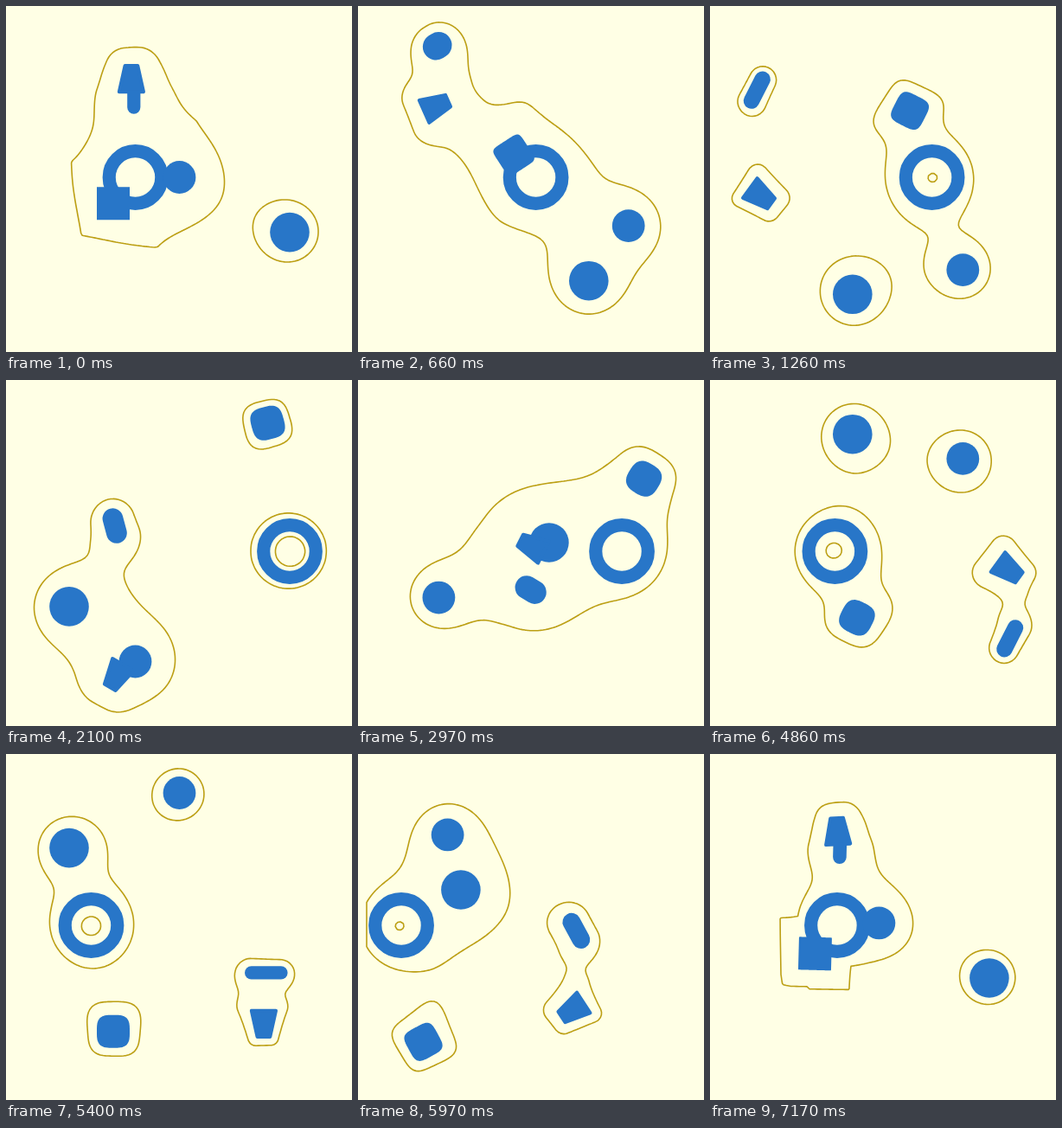
Recreate the animation shown at these times as an HTML page with a canvas. Size 400 by 400 pixels, loop 7200 ms.

```html
<!DOCTYPE html>
<html>
<head>
<meta charset="utf-8">
<style>
html, body { margin: 0; width: 100%; height: 100%; overflow: hidden; background: #ffffe5; }
canvas { display: block; width: 400px; height: 400px; }
</style>
</head>
<body>
<canvas id="stage" width="400" height="400"></canvas>
<script>
const ctx = document.getElementById('stage').getContext('2d');
const LOOP = 7200, STEP = 30, RAD = Math.PI / 180;
const CX = 200.5, CY = 198, AMP = 153, HALF = 190.5;
const CELL = 3, N = 127, SIDE = N + 3;
const BLUE = '#2876c8', LINE = '#bc9f14';
const { abs, min, max, hypot, cos, sin } = Math;
const clamp = (v, lo, hi) => max(lo, min(hi, v));
const field = new Float64Array(SIDE * SIDE);

// Grid lines; the outermost ones coincide with the border so that contours close there.
const offset = i => clamp(i - 1, 0, N) * CELL - HALF;

// Triangle wave of k cycles per loop, highest at the given angle.
function bounce(deg, k, peak) {
  const u = (deg - peak) * k / 360;
  return AMP * (abs(4 * (u - Math.floor(u)) - 2) - 1);
}

function toLocal(s, x, y) {
  const dx = x - s.x, dy = y - s.y;
  return [dx * s.c + dy * s.s, dy * s.c - dx * s.s];
}

function segDist(x, y, ax, ay, bx, by) {
  const dx = bx - ax, dy = by - ay;
  const h = clamp(((x - ax) * dx + (y - ay) * dy) / (dx * dx + dy * dy), 0, 1);
  return hypot(x - ax - h * dx, y - ay - h * dy);
}

function disc(r) {
  return {
    level: (u, v) => r / hypot(u, v),
    draw() { ctx.beginPath(); ctx.arc(0, 0, r, 0, 7); ctx.fill(); }
  };
}

function ring(r, w) {
  return {
    level: (u, v) => w / abs(hypot(u, v) - r),
    draw() { ctx.beginPath(); ctx.arc(0, 0, r, 0, 7); ctx.lineWidth = 2 * w; ctx.stroke(); }
  };
}

// Ball of the p-norm; very large powers overflow and drop out.
function normBall(r, p) {
  const norm = (u, v) => {
    const a = max(abs(u), abs(v)), b = min(abs(u), abs(v));
    return a ? a * (1 + (b / a) ** p) ** (1 / p) : 0;
  };
  return {
    level(u, v) {
      const m = max(abs(u), abs(v)) / r;
      return isFinite(p) && p * Math.log(m) > 88.7 ? 0 : r / norm(u, v);
    },
    draw() {
      ctx.beginPath();
      for (let i = 0; i < 120; i++) {
        const a = i * 3 * RAD, k = r / norm(cos(a), sin(a));
        ctx.lineTo(k * cos(a), k * sin(a));
      }
      ctx.fill();
    }
  };
}

function pill(w, h) {
  const r = min(w, h);
  return {
    level: (u, v) => r / hypot(max(abs(u) - w + r, 0), max(abs(v) - h + r, 0)),
    draw() { ctx.beginPath(); ctx.roundRect(-w, -h, 2 * w, 2 * h, r); ctx.fill(); }
  };
}

function trapezoid() {
  const a0 = -15.5, b0 = 16.5, a1 = 18.7, b1 = 9, size = 13.7, r = 2;
  return {
    level(u, v) {
      v = abs(v);
      if (u > a0 && u < a1 && v < b0 + (b1 - b0) * (u - a0) / (a1 - a0)) return 9;
      const d = min(segDist(u, v, a0, 0, a0, b0), segDist(u, v, a0, b0, a1, b1), segDist(u, v, a1, b1, a1, 0));
      return size / (size + d);
    },
    draw() {
      const p = a0 + r, q = a1 - r, e = b0 - r - 0.4, f = b1 - r + 0.4;
      ctx.beginPath();
      ctx.moveTo(p, -e); ctx.lineTo(q, -f); ctx.lineTo(q, f); ctx.lineTo(p, e);
      ctx.closePath();
      ctx.lineWidth = 2 * r;
      ctx.fill(); ctx.stroke();
    }
  };
}

function scene(deg) {
  const power = 1.2 + 1.5 / sin(deg / 2 * RAD);
  const stretch = -8.6 * cos(8 * deg * RAD);
  const place = (shape, x, y, turn = 0) => ({
    ...shape, x: CX + x, y: CY + y, turn: turn * RAD, c: cos(turn * RAD), s: sin(turn * RAD)
  });
  const b = (k, peak) => bounce(deg, k, peak);
  return [
    place(ring(30.3, 7.6), b(1, 120), 0),
    place(disc(22.8), b(2, 7.5), b(1, 52.6)),
    place(disc(18.9), b(2, 45), b(1, 90)),
    place(normBall(19, power), b(1, 135), b(1, 287.8), -deg),
    place(pill(16.2 + stretch, 16.2 - stretch), b(1, 239), b(1, 212.3), -deg),
    place(trapezoid(), b(1, 237.3), b(2, 102), 2 * deg - 90)
  ];
}

function fillField(shapes) {
  for (let j = 0; j < SIDE; j++) for (let i = 0; i < SIDE; i++) {
    let f = 0;
    if (i && j && i < SIDE - 1 && j < SIDE - 1) {
      for (const s of shapes) f += min(9, s.level(...toLocal(s, CX + offset(i), CY + offset(j))));
    }
    field[j * SIDE + i] = f;
  }
}

function drawContour() {
  const corners = [[0, 0], [1, 0], [1, 1], [0, 1]];
  ctx.beginPath();
  for (let j = 0; j < SIDE - 1; j++) for (let i = 0; i < SIDE - 1; i++) {
    const v = corners.map(([a, b]) => field[(j + b) * SIDE + i + a]);
    let count = 0;
    for (let e = 0; e < 4; e++) {
      const n = (e + 1) % 4;
      if (v[e] > 1 === v[n] > 1) continue;
      const k = (1 - v[e]) / (v[n] - v[e]), [ax, ay] = corners[e], [bx, by] = corners[n];
      const x0 = offset(i + ax), y0 = offset(j + ay);
      const x = CX + x0 + k * (offset(i + bx) - x0), y = CY + y0 + k * (offset(j + by) - y0);
      if (count++ % 2) ctx.lineTo(x, y); else ctx.moveTo(x, y);
    }
  }
  ctx.lineWidth = 1.6;
  ctx.lineCap = 'round';
  ctx.strokeStyle = LINE;
  ctx.stroke();
}

function render(ms) {
  const shapes = scene(Math.floor(ms % LOOP / STEP) * STEP / LOOP * 360);
  ctx.fillStyle = '#ffffe5';
  ctx.fillRect(0, 0, 400, 400);
  ctx.fillStyle = ctx.strokeStyle = BLUE;
  ctx.lineJoin = 'round';
  for (const s of shapes) {
    ctx.save();
    ctx.translate(s.x, s.y);
    ctx.rotate(s.turn);
    s.draw();
    ctx.restore();
  }
  fillField(shapes);
  drawContour();
}

const start = performance.now();
function tick() {
  render(performance.now() - start);
  requestAnimationFrame(tick);
}
tick();
</script>
</body>
</html>
```
